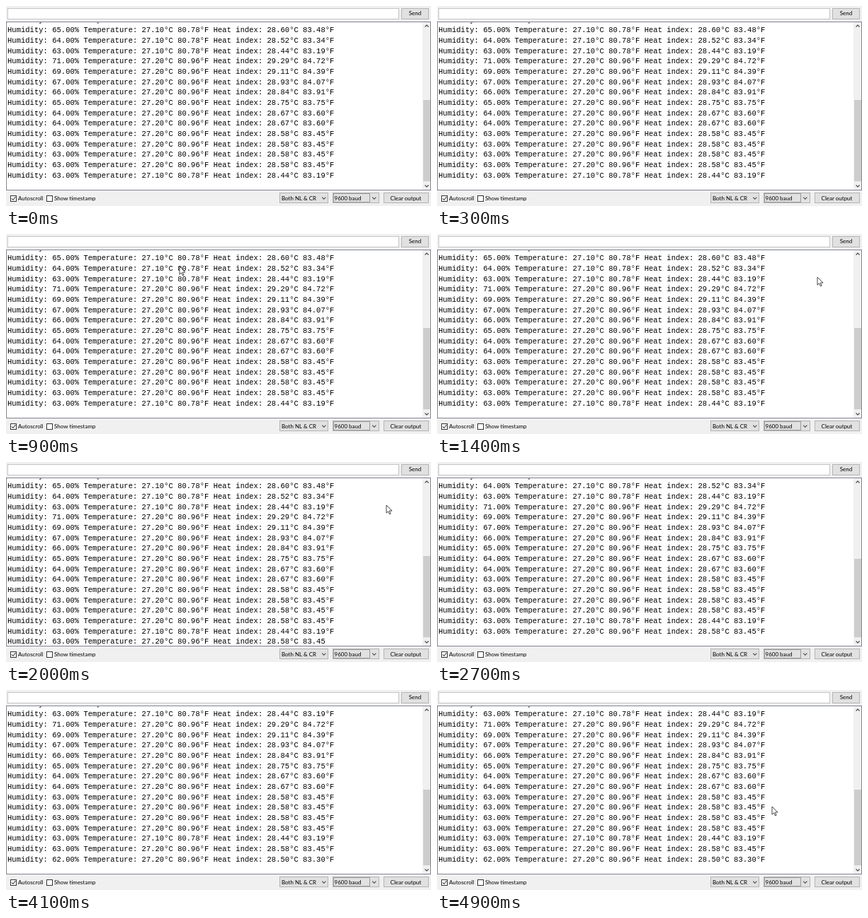
An HTML page that plays this animation: 600x283 px, repeating every 5000 ms.

```html
<!DOCTYPE html>
<html lang="en">
<head>
<meta charset="utf-8">
<title>Serial monitor</title>
<style>
  html, body { margin: 0; width: 100%; height: 100%; overflow: hidden; background: #f0f0f0; }
  svg { display: block; }
  .ui { font: 8px Lato, "Open Sans", sans-serif; fill: #000; }
  #log { font: 10.54px "Liberation Mono", "Courier New", monospace; fill: #000; }
  .input { fill: #fff; stroke: #c4c4c4; }
  .check { fill: #fff; stroke: #333; }
  .button { fill: #e1e1e1; stroke: #b4b4b4; }
  .mark { fill: none; stroke: #444; stroke-width: 1.1; }
</style>
</head>
<body>
<svg width="600" height="283" viewBox="0 0 600 283">
  <rect width="600" height="283" fill="#f0f0f0"/>

  <rect class="input" x="2.5" y="3.5" width="552" height="15"/>
  <rect class="button" x="558.5" y="3.5" width="38" height="15"/>

  <rect x=".5" y="22.5" width="599" height="238" fill="#fff" stroke="#828790"/>
  <svg y="23" width="588" height="237" viewBox="0 23 588 237"><g id="log"></g></svg>

  <rect x="588" y="23" width="11" height="237" fill="#f0f0f0"/>
  <rect id="thumb" x="589" width="10" fill="#cdcdcd"/>
  <path class="mark" d="M591.5 29.5l2.5-2.5 2.5 2.5M591.5 253.5l2.5 2.5 2.5-2.5"/>

  <rect class="check" x="6.5" y="268.5" width="8" height="8"/>
  <path class="mark" d="M8 272.4l2 2.1 3.4-4.3"/>
  <rect class="check" x="57.5" y="268.5" width="8" height="8"/>

  <rect class="button" x="386.5" y="264.5" width="68" height="14"/>
  <rect class="button" x="461.5" y="264.5" width="65" height="14"/>
  <rect x="462.5" y="265.5" width="51" height="12" fill="none" stroke="#555" stroke-dasharray="1 1"/>
  <path class="mark" d="M446.2 270.7l2.6 2.6 2.6-2.6M517.2 270.7l2.6 2.6 2.6-2.6"/>
  <rect class="button" x="533.5" y="264.5" width="63" height="14"/>

  <g class="ui">
    <text x="577.5" y="13" text-anchor="middle">Send</text>
    <text x="17" y="274.8">Autoscroll</text>
    <text x="68" y="274.8">Show timestamp</text>
    <text x="389" y="274.8">Both NL &amp; CR</text>
    <text x="463.5" y="274.8">9600 baud</text>
    <text x="564.5" y="274.8" text-anchor="middle">Clear output</text>
  </g>

  <path id="cursor" d="M0 0V11.2L2.6 8.8 4.4 12.9 6.1 12.2 4.3 8.1H8Z" fill="#fff" stroke="#333" stroke-width=".9"/>
</svg>
<script>
const LOOP = 5000, STEP = 100, LINE = 14.66, FIRST = 37.4;
const BEFORE = 4, VISIBLE = 16, TOTAL = 18;
const $ = id => document.getElementById(id);
const fix = n => n.toFixed(2);
const toF = c => c * 1.8 + 32;
const toC = f => (f - 32) / 1.8;

// Rothfusz regression: t in °F, h in percent
const heatIndex = (t, h) =>
  -42.379 + 2.04901523 * t + 10.14333127 * h - 0.22475541 * t * h
  - 0.00683783 * t * t - 0.05481717 * h * h + 0.00122874 * t * t * h
  + 0.00085282 * t * h * h - 0.00000199 * t * t * h * h;

// Humidity falls steadily, jumps at k = 0, then decays; the air is briefly cooler at k = 11
function report(k) {
  const hum = k < 0 ? 62 - k : Math.round(62.3 + 8.7 * 0.74 ** k);
  const temp = k < 0 || k === 11 ? 27.1 : 27.2;
  const heat = heatIndex(toF(temp), hum);
  return `Humidity: ${fix(hum)}% Temperature: ${fix(temp)}°C ${fix(toF(temp))}°F ` +
    `Heat index: ${fix(toC(heat))}°C ${fix(heat)}°F`;
}

// The first line is the one before 66 %, mostly hidden by the top edge
const lines = Array.from({ length: TOTAL }, (_, i) => {
  const node = document.createElementNS("http://www.w3.org/2000/svg", "text");
  node.setAttribute("x", 2);
  node.setAttribute("y", FIRST + (i - 1) * LINE);
  $("log").append(node);
  return { node, text: report(i < BEFORE ? i - BEFORE + 0 : i - BEFORE) };
});

const mix = (a, b, k) => a + (b - a) * Math.min(1, Math.max(0, k));

function pointerAt(t) {
  if (t >= 800 && t < 2500) {
    const k = (t - 900) / 500;
    return [mix(245, 537, k), mix(46, 61, k)];
  }
  if (t >= 4700) {
    const k = (t - 4700) / 200;
    return [mix(490, 473, k), mix(184, 165, k)];
  }
  return null;
}

function draw(now) {
  const t = Math.floor(now % LOOP / STEP) * STEP;
  // Every two seconds a line arrives; its end follows one step later and scrolls the log
  const started = Math.floor(t / 2000);
  const scrolled = Math.floor(Math.max(0, t - STEP) / 2000);

  lines.forEach(({ node, text }, i) => {
    node.textContent = i < VISIBLE + scrolled ? text
      : i < VISIBLE + started ? text.slice(0, -2) : "";
  });
  $("log").setAttribute("transform", `translate(0 ${-scrolled * LINE})`);

  const top = 133 + scrolled * 4;
  $("thumb").setAttribute("y", top);
  $("thumb").setAttribute("height", 248 - top);

  const at = pointerAt(t);
  $("cursor").setAttribute("visibility", at ? "visible" : "hidden");
  if (at) $("cursor").setAttribute("transform", `translate(${at})`);
}

const start = performance.now();
function tick() {
  draw(performance.now() - start);
  requestAnimationFrame(tick);
}
tick();
</script>
</body>
</html>
```
